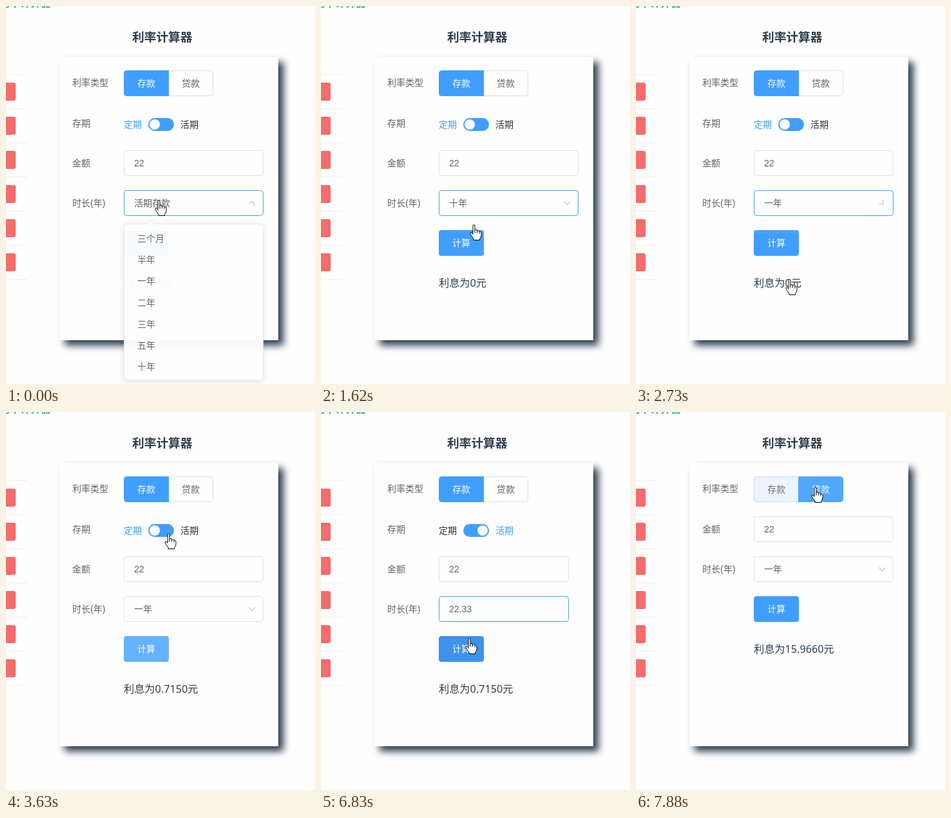
Animation of 480 by 587 pixels, one loop 8 s. Source, as an HTML page:

```html
<!DOCTYPE html>
<html lang="zh-CN">
<head>
<meta charset="utf-8">
<title>利率计算器</title>
<style>
  html, body { margin: 0; width: 100%; height: 100%; overflow: hidden; background: #fefefe; }
  svg { display: block; width: 480px; height: 587px; }
  text { font: 14px "Liberation Sans", "Noto Sans CJK SC", "Noto Sans CJK", sans-serif; fill: #606266; white-space: pre; }
  .title { font-size: 18.72px; font-weight: 700; fill: #2c3e50; }
  .nav { font-size: 16px; font-weight: 700; fill: #42b983; text-anchor: end; }
  .result { font: 16.2px "Noto Sans", "Noto Sans CJK SC", "Noto Sans CJK", sans-serif; fill: #2c3e50; }
  .popup { filter: drop-shadow(0 2px 6px rgba(0, 0, 0, .1)); }
  .shade { filter: blur(6px); }
</style>
</head>
<body>
<script>
const LOOP = 8000;
const BLUE = '#409eff', LIGHT = '#66b1ff', PRESSED = '#3e92ec', WHITE = '#fefefe';
const BORDER = '#dcdfe6', GREY = '#606266', DARK = '#303133';

const STEPS = [0, 150, 270, 420, 540, 690, 810, 960, 1080, 1200, 1350, 1470, 1620, 1740, 1890, 2010, 2160,
  2310, 2430, 2580, 2700, 2850, 2970, 3120, 3240, 3390, 3510, 3630, 3780, 3900, 4050, 4300,
  4450, 4570, 4720, 4840, 4990, 5140, 5600, 5880, 6000, 6530, 6680, 6830, 6950, 7220, 7370, 7490,
  7640, 7760, 7880];

// time, x, y, pointer shape from then on
const PATH = [
  [0, 237, 301, 'hand'], [150, 238, 338, 'hand'], [540, 237, 530, 'hand'], [690, 235, 561, 'hand'],
  [1080, 235, 561, 'hand'], [1200, 235, 540, 'arrow'], [1470, 236, 380, 'hand'], [1740, 238, 306, 'hand'],
  [2010, 239, 312, 'hand'], [2160, 241, 359, 'hand'], [2430, 239, 424, 'hand'], [2700, 238, 424, 'hand'],
  [2970, 232, 362, 'hand'], [3240, 233, 361, 'hand'], [3390, 238, 325, 'hand'], [3630, 252, 188, 'hand'],
  [3900, 251, 187, 'hand'], [4050, 247, 204, 'arrow'], [4300, 232, 245, 'beam'], [4570, 220, 309, 'beam'],
  [4720, 150, 312, 'beam'], [4990, 207, 322, 'beam'], [6000, 207, 322, 'beam'], [6530, 212, 336, 'arrow'],
  [6680, 226, 350, 'hand'], [6830, 230, 351, 'hand'], [6950, 230, 351, 'hand'], [7220, 246, 268, 'arrow'],
  [7490, 279, 115, 'hand'], [7640, 278, 116, 'hand']
];

const TOGGLES = [-160, 845, 1977, 2570];   // popup opens, closes, opens, closes
const CALC = [2970, 6830];
const SWITCH = 3720, LOAN = 7690;
const ITEMS = ['三个月', '半年', '一年', '二年', '三年', '五年', '十年'];
const PICKS = [[0, '活期存款'], [845, '十年'], [2570, '一年']];
const TYPED = [[0, '1'], [4990, '2'], [5140, '22'], [5600, '22.'], [5880, '22.3'], [6000, '22.33']];
const RESULTS = [[0, '0'], [3120, '0.7150'], [6950, '15.9660']];

const last = (rows, t) => rows.filter(r => r[0] <= t).pop();

function bezier(x1, y1, x2, y2) {
  const at = (a, b, s) => 3 * (1 - s) ** 2 * s * a + 3 * (1 - s) * s * s * b + s ** 3;
  return ms => {
    const x = Math.min(1, Math.max(0, ms / 300));
    let lo = 0, hi = 1;
    for (let i = 0; i < 24; i++) {
      const mid = (lo + hi) / 2;
      if (at(x1, x2, mid) < x) lo = mid; else hi = mid;
    }
    return at(y1, y2, hi);
  };
}
const ease = bezier(.25, .1, .25, 1);
const zoom = bezier(.23, 1, .32, 1);

function mix(a, b, p) {
  const part = (c, i) => parseInt(c.substr(1 + 2 * i, 2), 16);
  return `rgb(${[0, 1, 2].map(i => Math.round(part(a, i) + (part(b, i) - part(a, i)) * p))})`;
}

function add(parent, tag, attrs) {
  const node = document.createElementNS('http://www.w3.org/2000/svg', tag);
  parent.appendChild(node);
  return set(node, attrs);
}
function set(node, attrs) {
  for (const k in attrs) node.setAttribute(k, attrs[k]);
  return node;
}
const show = (node, on) => set(node, { visibility: on ? 'inherit' : 'hidden' });
const group = parent => add(parent, 'g', {});
const rect = (parent, x, y, width, height, fill, more) =>
  add(parent, 'rect', { x, y, width, height, fill, ...more });
function label(parent, x, y, str, more) {
  const node = add(parent, 'text', { x, y, ...more });
  node.textContent = str;
  return node;
}
const tint = (node, color) => { node.style.fill = color; };

const svg = add(document.body, 'svg', { viewBox: '0 0 480 587' });
rect(svg, 0, 0, 480, 587, WHITE);

// page behind the card
label(svg, 70, 1, '利率计算器', { class: 'nav' });
for (let i = 0; i < 7; i++) {
  rect(svg, 0, 106 + 53 * i, 33, 1, '#ebeef5');
  if (i < 6) rect(svg, -10, 119 + 53 * i, 25, 28, '#f56c6c', { rx: 3 });
}
label(svg, 196, 54.5, '利率计算器', { class: 'title' });
rect(svg, 91, 87, 340, 440, '#2c3e50', { class: 'shade' });
rect(svg, 83, 79, 340, 440, WHITE);

// rate type
label(svg, 103, 124, '利率类型');
const radio = group(svg);
const leftBox = add(radio, 'path', { d: 'M253 100.5H187.5Q183.5 100.5 183.5 104.5V135.5Q183.5 139.5 187.5 139.5H253' });
const rightBox = add(radio, 'path', { d: 'M252.5 100.5H317.5Q321.5 100.5 321.5 104.5V135.5Q321.5 139.5 317.5 139.5H252.5Z' });
const leftEdge = rect(radio, 252, 100, 1, 40, BLUE);
const leftText = label(radio, 204, 125, '存款');
const rightText = label(radio, 273, 125, '贷款');

// term switch
const term = group(svg);
label(term, 103, 187, '存期');
const fixed = label(term, 183, 189, '定期');
const demand = label(term, 271, 189, '活期');
rect(term, 221, 174, 40, 20, BLUE, { rx: 10 });
const knob = add(term, 'circle', { cy: 184, r: 8, fill: WHITE });

// fields, button, result
const lower = group(svg);
label(lower, 103, 249, '金额');
label(lower, 103, 311, '时长(年)');
const boxes = [224.5, 286.5].map(y => rect(lower, 183.5, y, 216, 39, WHITE, { rx: 4, stroke: BORDER }));
label(lower, 199, 249, '22');
const marked = rect(lower, 199, 298, 8, 17, '#3390ff');
const value = label(lower, 199, 311, '');
const caret = rect(lower, 0, 298, 1, 16, '#303133');
const chevron = add(lower, 'path', { d: 'M-5 2.5L0 -2.5L5 2.5', fill: 'none', stroke: '#c0c4cc', 'stroke-width': 1.2 });
const calc = rect(lower, 183, 348, 70, 40, BLUE, { rx: 4 });
tint(label(lower, 204, 373, '计算'), WHITE);
const result = label(lower, 183, 436, '', { class: 'result' });

// option list
const popup = add(svg, 'g', { class: 'popup' });
rect(popup, 183.5, 338.5, 216, 249, WHITE, { rx: 4, stroke: '#e4e7ed' });
add(popup, 'path', { d: 'M219 339L225 333L231 339', fill: WHITE, stroke: '#e4e7ed' });
rect(popup, 219.5, 339, 11, 1, WHITE);
const hoverBar = rect(popup, 184, 0, 215, 34, '#f5f7fa');
const options = ITEMS.map((name, i) => label(popup, 204, 367 + 34 * i, name));

// pointers, hot spot at 0,0
const cursor = group(svg);
const ink = { fill: '#fff', stroke: '#000', 'stroke-linejoin': 'round' };
const shapes = {
  hand: add(cursor, 'path', {
    d: 'M-1.5 14V2Q-1.5 0 0 0T1.5 2V9Q2 8 3.5 8T5 10Q5.5 9 7 9.3T8.5 11Q9 10.3 10.2 10.8T11.5 13V16' +
       'Q11.5 20 9 22V24H-.5V22Q-4 17 -5.5 14.5Q-6 12.5 -4.5 12.3T-1.5 15ZM1.5 9V13M5 10V13M8.5 11V14', ...ink }),
  arrow: add(cursor, 'path', { d: 'M0 0V17L4 13.2L6.7 19.3L9 18.3L6.4 12.3H12Z', ...ink }),
  beam: add(cursor, 'path', { d: 'M-3.5 -7.5H3.5M0 -7.5V7.5M-3.5 7.5H3.5', fill: 'none', stroke: '#000' })
};

function pointer(t) {
  const i = PATH.filter(k => k[0] <= t).length - 1;
  const a = PATH[i], b = PATH[i + 1] || a;
  const p = b === a ? 0 : (t - a[0]) / (b[0] - a[0]);
  return { x: a[1] + (b[1] - a[1]) * p, y: a[2] + (b[2] - a[2]) * p, kind: a[3] };
}

function drawPopup(t, y) {
  const i = TOGGLES.filter(s => s <= t).length - 1;
  const open = i % 2 === 0, age = t - TOGGLES[i];
  const size = open ? zoom(age) : 1 - zoom(age);
  const turn = open ? 1 - ease(age) : ease(age);
  show(popup, size > .005);
  set(popup, { transform: `translate(0 ${338 * (1 - size)}) scale(1 ${Math.max(size, .001)})`, opacity: size });
  set(chevron, { transform: `translate(382.5 306) rotate(${180 * turn})` });
  const row = Math.floor((y - 345) / 34);
  show(hoverBar, size > .005 && row >= 0 && row < 7);
  set(hoverBar, { y: 345 + 34 * row });
  const picked = last(PICKS, t)[1];
  options.forEach((o, k) => {
    const on = ITEMS[k] === picked;
    tint(o, on ? BLUE : GREY);
    o.style.fontWeight = on ? 700 : 400;
  });
}

function drawFields(t, x, y) {
  const loan = t >= LOAN, numeric = t >= SWITCH && !loan;
  const typing = numeric && t >= 4570 && t < 6850;
  const selecting = t >= 4720 && t < 4990;
  set(lower, { transform: `translate(0 ${loan ? -62 : 0})` });
  boxes.forEach(b => set(b, { width: numeric ? 201 : 216 }));
  set(boxes[1], { stroke: typing || t < CALC[0] ? BLUE : BORDER });
  value.textContent = last(numeric ? TYPED : PICKS, t)[1];
  tint(value, selecting ? WHITE : GREY);
  show(marked, selecting);
  show(caret, typing && !selecting && t < 6530);
  set(caret, { x: Math.floor(199 + value.getComputedTextLength()) });
  show(chevron, !numeric);

  const over = x > 183 && x < 253 && y > 348 && y < 388;
  const focused = t >= CALC[0] && t < SWITCH || t >= CALC[1] && t < LOAN;
  const pressed = CALC.some(c => t >= c && t < c + 120);
  set(calc, { fill: pressed ? PRESSED : over || focused ? LIGHT : BLUE });
  result.textContent = `利息为${last(RESULTS, t)[1]}元`;
}

function drawChoices(t) {
  const flip = ease(t - SWITCH), swap = ease(t - LOAN);
  show(term, t < LOAN);
  set(knob, { cx: 231 + 20 * flip });
  tint(fixed, mix(BLUE, DARK, flip));
  tint(demand, mix(DARK, BLUE, flip));
  const left = mix(BLUE, WHITE, swap), right = mix(WHITE, BLUE, swap);
  set(leftBox, { fill: left, stroke: mix(BLUE, BORDER, swap) });
  set(rightBox, { fill: right, stroke: mix(BORDER, BLUE, swap) });
  show(leftEdge, t < LOAN);
  tint(leftText, mix(WHITE, GREY, swap));
  tint(rightText, mix(t >= 7490 ? BLUE : GREY, WHITE, swap));
}

function draw(now) {
  const clock = now % LOOP;
  const t = STEPS.filter(s => s <= clock).pop();
  const { x, y, kind } = pointer(t);
  drawPopup(t, y);
  drawFields(t, x, y);
  drawChoices(t);
  set(cursor, { transform: `translate(${Math.round(x) + .5} ${Math.round(y) + .5})` });
  for (const k in shapes) show(shapes[k], k === kind);
}

const start = performance.now();
function tick() {
  draw(performance.now() - start);
  requestAnimationFrame(tick);
}
tick();
</script>
</body>
</html>
```
